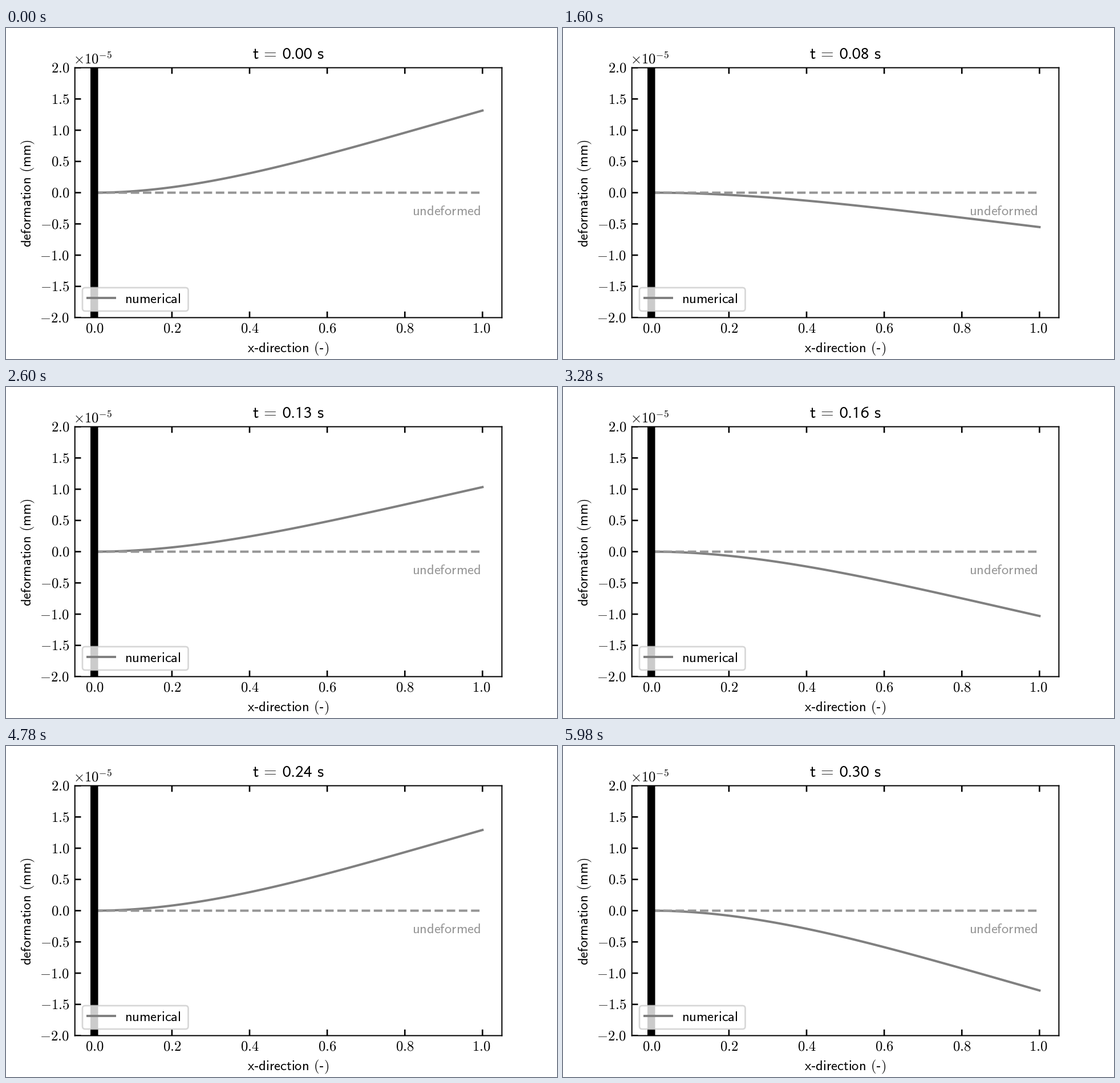
These frames come from a looping animation (966x580 px, 6000 ms). A matplotlib script:

```python
import numpy as np
import matplotlib.pyplot as plt
from matplotlib.animation import FuncAnimation
from matplotlib.patches import FancyBboxPatch

plt.rcParams["mathtext.fontset"] = "cm"
plt.rcParams["path.snap"] = False

W, H, DPI = 966, 580, 128
PX = 72 / DPI  # points per pixel
EM = 24.6      # base text size in pixels
FRAMES, INTERVAL = 300, 20
GREY, PALE = "#808080", "#959595"
HYPHEN = r"\mathrm{‐}"
SPACE = r"\,\:"

fig = plt.figure(figsize=(W / DPI, H / DPI), dpi=DPI, facecolor="white")
ax = fig.add_axes([0.125, 0.125, 0.775, 0.755])
x_ticks, y_ticks = np.arange(0, 1.1, 0.2), np.arange(-2, 2.1, 0.5)
ax.set(xlim=(-0.05, 1.05), ylim=(-2, 2), xticks=[], yticks=[])
for spine in ax.spines.values():
    spine.set_linewidth(2 * PX)

# Inward ticks on the left, bottom and top
tick_x, tick_y = 10.7 / (0.775 * W), 10.7 / (0.755 * H)
tick_style = dict(color="black", lw=2.6 * PX, zorder=2.5)
for y0, y1 in ((0, tick_y), (1 - tick_y, 1)):
    ax.vlines(x_ticks, y0, y1, transform=ax.get_xaxis_transform(), **tick_style)
ax.hlines(y_ticks, 0, tick_x, transform=ax.get_yaxis_transform(), **tick_style)
ax.set(xlim=(-0.05, 1.05), ylim=(-2, 2))


def label(x, y, s, size=EM, **kw):
    """Math text at a pixel position measured from the top left."""
    kw = {"va": "baseline", "ha": "center", **kw}
    return fig.text(x / W, 1 - y / H, f"${s}$", fontsize=size * PX, **kw)


def sans(s):
    return r"\mathsf{%s}" % s


def sans_digits(s):
    """Swap digits for their mathematical sans-serif forms."""
    return "".join(chr(0x1D7E2 + int(c)) if c.isdigit() else c for c in s)


def to_px(x, y):
    px, py = ax.transData.transform((x, y))
    return px, H - py


# Tick labels and captions
for v in x_ticks:
    shift = -2 if v > 0.9 else 0
    label(to_px(v, 0)[0] + shift, 534, r"\mathrm{%.1f}" % v)
for v in y_ticks:
    label(111, to_px(0, v)[1] + 8, r"\mathrm{%.1f}" % v, ha="right")
label(118.5, 62.5, r"\times\mathrm{10}^{\mathrm{-5}}", ha="left")
label(495, 568, sans("x") + HYPHEN + sans("direction") + SPACE
      + sans("(") + HYPHEN + sans(")"))
label(53, 290, sans("deformation") + SPACE + sans("(mm)"),
      rotation=90, ha="right", va="center")
label(832.5, 328, sans("undeformed"), ha="right", color=PALE)
title = label(495, 54, "", size=29.2)


def title_text(t):
    value = sans_digits(f"{t:.2f}")
    return "$" + sans("t") + r"\,=\," + r"\mathrm{%s}" % value + SPACE + sans("s") + "$"


# Beam, rest line and clamp
beam, = ax.plot([], [], color=GREY, lw=4 * PX, zorder=2)
ax.plot([0, 1], [0, 0], "--", color=PALE, lw=4.02 * PX, zorder=2.2)
ax.axvline(0, color="black", lw=13.5 * PX, zorder=2.4)

# Legend
fig.add_artist(FancyBboxPatch(
    (134, H - 496), 185.5, 41, transform=None,
    boxstyle="round,pad=0,rounding_size=4.9", lw=2.6 * PX,
    fc=(1, 1, 1, 0.8), ec=(0.8, 0.8, 0.8, 0.8), zorder=3))
fig.add_artist(plt.Line2D([143, 191], [H - 473, H - 473], transform=None,
                          color=GREY, lw=4 * PX, zorder=4))
label(208, 482, sans("numerical"), ha="left", zorder=5)

# Free vibration of a cantilever: first mode with a trace of the second
TIP, PERIOD, PHASE, DECAY = 1.315, 118.0, 0.4, 4e-5
BETA = np.array([1.875104, 4.694091])
weights = TIP * np.array([1.007, 0.007])
x = np.linspace(0, 1, 101)
bx = BETA[:, None] * x
sigma = (np.sinh(BETA) - np.sin(BETA)) / (np.cosh(BETA) + np.cos(BETA))
shapes = (np.cosh(bx) - np.cos(bx)
          - sigma[:, None] * (np.sinh(bx) - np.sin(bx))) / 2
ratio = (BETA / BETA[0])**2


def update(n):
    swing = np.cos(2 * np.pi / PERIOD * ratio * (n + PHASE))
    fade = np.exp(-DECAY * ratio**2 * n)
    beam.set_data(x, (weights * swing * fade) @ shapes)
    title.set_text(title_text(n / 1000))
    return beam, title


def init():
    return update(0)


anim = FuncAnimation(fig, update, frames=FRAMES, init_func=init,
                     interval=INTERVAL, repeat=True, repeat_delay=0)
plt.show()
```
